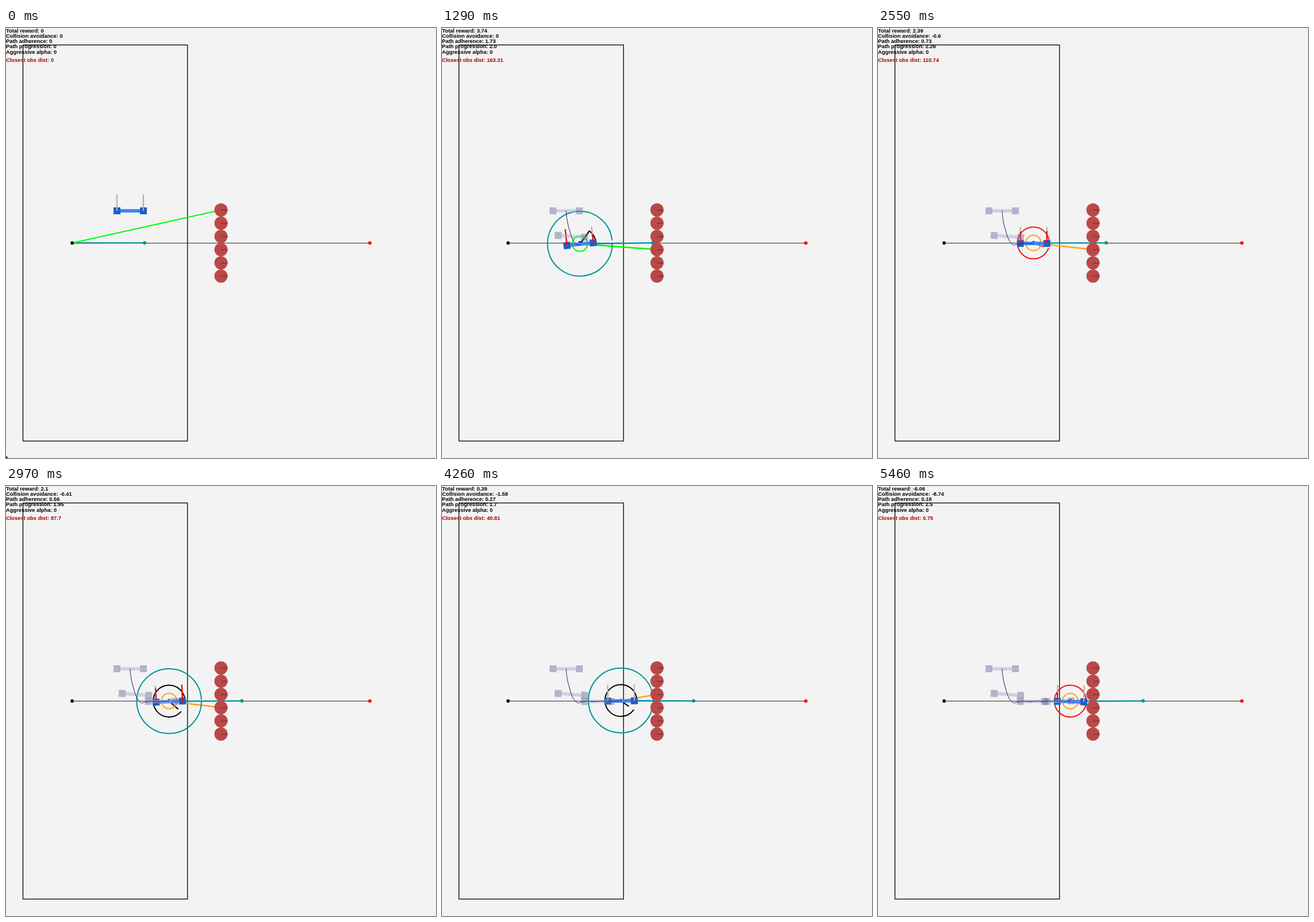
Animation, 748 px wide and 748 px high, one loop 5.49 s. Source, as an HTML page with a canvas:

```html
<!DOCTYPE html>
<html lang="en">
<head>
<meta charset="utf-8">
<title>Drone path following</title>
<style>
html, body { margin: 0; width: 100%; height: 100%; overflow: hidden; background: #f3f3f3; }
canvas { display: block; }
</style>
</head>
<body>
<canvas id="stage" width="748" height="748"></canvas>
<script>
const ctx = document.getElementById('stage').getContext('2d');
const STEP = 30, STEPS = 183, TAU = Math.PI * 2;
const PATH_Y = 374, START_X = 115, END_X = 633, WALL_X = 374, LOOK = 126.2;
const UNIT = 0.576, SAFE = 40, PROGRESS = 3.68, SPEED_LEN = 29;
const SETTLED = 43, GHOST_FIRST = 25, GHOST_EVERY = 60;
const TEAL = '#009498';
const obstacles = Array.from({ length: 6 }, (_, i) => 316.5 + 23 * i);

const nearest = y => obstacles.reduce((m, o) => Math.abs(o - y) < Math.abs(m - y) ? o : m);
const distance = p => (Math.hypot(WALL_X - p.x, nearest(p.y) - p.y) - SAFE) / UNIT;

function key(n, dist, y, progress, vy, tilt, left, right, hit, adhere) {
  const x = WALL_X - Math.sqrt((dist * UNIT + SAFE) ** 2 - (nearest(y) - y) ** 2);
  return { n, x, y, progress, vx: progress / PROGRESS, vy, tilt, left, right, hit, adhere };
}

const keys = [
  key(0, 204.9, 318, 0.2, 1.2, 0, 0, 0, 0, -4),
  key(20, 195.03, 352, 2.54, 2.1, 0, 0.7, 1, 0, -1.87),
  key(GHOST_FIRST, 189.2, 362.5, 2.65, 2, -4, 0.8, 0.4, 0, 0),
  key(SETTLED, 163.31, 376, 2.003, -0.78, 6, 1, 0.52, 0, 1.734),
  key(70, 138.07, 374.5, 2.6, 0, -2.5, 0.62, 0.43, -0.8, 0.91),
  key(99, 87.7, 375, 1.95, 0.45, 2.5, 0.85, 1, -0.41, 0.56),
  key(142, 40.81, 373.9, 1.7, 0.33, 0.6, 0, 0, -1.58, 0.27),
  key(182, 0.75, 375, 2.7, 0.05, -1, 0.55, 0, -8.74, 0.18)
];

function hermite(p, q, m, k, span, u) {
  const d = q - p, A = (m + k) * span - 2 * d, B = 3 * d - (2 * m + k) * span;
  return ((A * u + B) * u + m * span) * u + p;
}

const unit = v => Math.min(1, Math.max(0, v));

function poseAt(n) {
  const i = Math.max(1, keys.findIndex(k => k.n >= n));
  const a = keys[i - 1], b = keys[i], span = b.n - a.n, u = (n - a.n) / span;
  const mix = name => a[name] + (b[name] - a[name]) * u;
  // on the path the drone only rocks a little around it
  const settled = a.n >= SETTLED;
  const wave = settled ? Math.sin(TAU * u * Math.round(span / 20)) : 0;
  return {
    x: hermite(a.x, b.x, a.vx, b.vx, span, u),
    y: settled ? mix('y') + 0.5 * wave : hermite(a.y, b.y, a.vy, b.vy, span, u),
    vx: mix('vx'),
    vy: mix('vy') + 0.3 * wave,
    tilt: (mix('tilt') + 1.2 * wave) * Math.PI / 180,
    left: unit(mix('left') + 0.3 * wave),
    right: unit(mix('right') - 0.3 * wave),
    hit: mix('hit'),
    adhere: mix('adhere'),
    progress: Math.min(2.5, mix('progress'))
  };
}

const track = Array.from({ length: STEPS }, (_, n) => poseAt(n));

function line(x1, y1, x2, y2, color, width) {
  ctx.strokeStyle = color;
  ctx.lineWidth = width;
  ctx.beginPath();
  ctx.moveTo(x1, y1);
  ctx.lineTo(x2, y2);
  ctx.stroke();
}

function dot(x, y, r, color) {
  ctx.fillStyle = color;
  ctx.beginPath();
  ctx.arc(x, y, r, 0, TAU);
  ctx.fill();
}

// counter-clockwise arc from the body tilt to a heading
function headingArc(p, r, angle, color) {
  const sweep = ((angle - p.tilt) % TAU + TAU) % TAU;
  ctx.strokeStyle = color;
  ctx.lineWidth = 2;
  ctx.beginPath();
  ctx.arc(p.x - 0.4, p.y - 0.8, r, -p.tilt, -p.tilt - sweep, true);
  ctx.stroke();
}

function body(p, bar, motor, props) {
  ctx.save();
  ctx.translate(p.x, p.y);
  ctx.rotate(-p.tilt);
  ctx.fillStyle = bar;
  ctx.fillRect(-17, -3, 34, 6);
  ctx.fillStyle = motor;
  for (const x of [-23, 23]) ctx.fillRect(x - 6, -6, 12, 12);
  if (props) {
    for (const [x, thrust] of [[-23, p.left], [23, p.right]]) {
      line(x, 0, x, -28.5, '#b0b0b0', 2.2);
      line(x, 0, x, -28.5 * thrust, '#f00000', 2.2);
    }
  }
  ctx.restore();
}

function num(v) {
  const r = Math.round(v * 100) / 100;
  return r === 0 ? '0' : Number.isInteger(r) ? r.toFixed(1) : String(r);
}

function labels(n, p) {
  const on = n > 0 ? 1 : 0, dist = on * distance(p);
  const hit = dist < 150 ? on * p.hit : 0;
  const adhere = on * p.adhere, progress = on * p.progress;
  ctx.font = 'bold 9.35px "Liberation Sans", Arial, sans-serif';
  ctx.fillStyle = '#000';
  [
    ['Total reward', hit + adhere + progress],
    ['Collision avoidance', hit],
    ['Path adherence', adhere],
    ['Path progression', progress],
    ['Aggressive alpha', 0]
  ].forEach(([name, v], i) => ctx.fillText(name + ': ' + num(v), 0, 7.5 + 9.25 * i));
  ctx.fillStyle = '#a00000';
  ctx.fillText('Closest obs dist: ' + num(dist), 0, 59.3);
}

function guides(n, p) {
  const first = n === 0;
  const from = first ? { x: START_X, y: PATH_Y } : { x: p.x, y: p.y - 0.5 };
  const lookX = from.x + LOOK, targetY = first ? obstacles[0] : nearest(p.y);
  const near = !first && distance(p) < 150 ? '#ffa114' : '#00ff00';

  line(from.x, from.y, lookX, PATH_Y - 0.1, TEAL, 2.3);
  dot(lookX, PATH_Y - 0.2, 3, TEAL);
  line(from.x, from.y, WALL_X, targetY, near, 2.3);
  dot(first ? 0 : p.x, first ? 748 : PATH_Y - 0.5, 3, '#0000ff');
  if (first) return;

  const course = Math.atan2(-p.vy, p.vx);
  const toWall = Math.atan2(p.y - targetY, WALL_X - p.x);
  const speedColor = Math.abs(course - toWall) < 0.35 ? '#ff1010' : '#000';
  headingArc(p, 56.3, Math.atan2(p.y - PATH_Y + 0.1, LOOK), TEAL);
  line(p.x, p.y, p.x + p.vx * SPEED_LEN, p.y + p.vy * SPEED_LEN, speedColor, 2.2);
  headingArc(p, 27.7, course, speedColor);
  headingArc(p, 13.4, toWall, near);
}

function draw(n) {
  const p = track[n];
  ctx.fillStyle = '#f3f3f3';
  ctx.fillRect(0, 0, 748, 748);

  ctx.strokeStyle = '#000';
  ctx.lineWidth = 1.3;
  ctx.strokeRect(29.5, 29.5, 286.2, 689);
  line(START_X, 374.2, END_X, 374.2, '#222', 1);

  guides(n, p);
  dot(START_X, PATH_Y, 2.9, '#000');
  dot(END_X, PATH_Y, 2.9, '#f00');
  for (const y of obstacles) {
    dot(WALL_X, y, 11.5, '#bb4848');
    line(WALL_X, y + 0.3, WALL_X + 11.5, y + 0.3, '#4a3030', 1);
  }

  body(p, '#4285f4', '#1f5cc4', true);

  // faded copies left behind along the flight
  const ghost = i => body(track[i], 'rgba(171,175,205,.5)', 'rgba(115,117,165,.5)', false);
  if (n > 0) ghost(0);
  for (let i = GHOST_FIRST; i < n; i += GHOST_EVERY) ghost(i);

  ctx.strokeStyle = '#1c1c66';
  ctx.lineWidth = 1;
  ctx.beginPath();
  for (let i = 0; i <= n; i++) ctx.lineTo(track[i].x, track[i].y);
  ctx.stroke();

  labels(n, p);
}

const begin = performance.now();
function tick() {
  const t = Math.max(0, performance.now() - begin);
  draw(Math.floor(t / STEP) % STEPS);
  requestAnimationFrame(tick);
}
tick();
</script>
</body>
</html>
```
